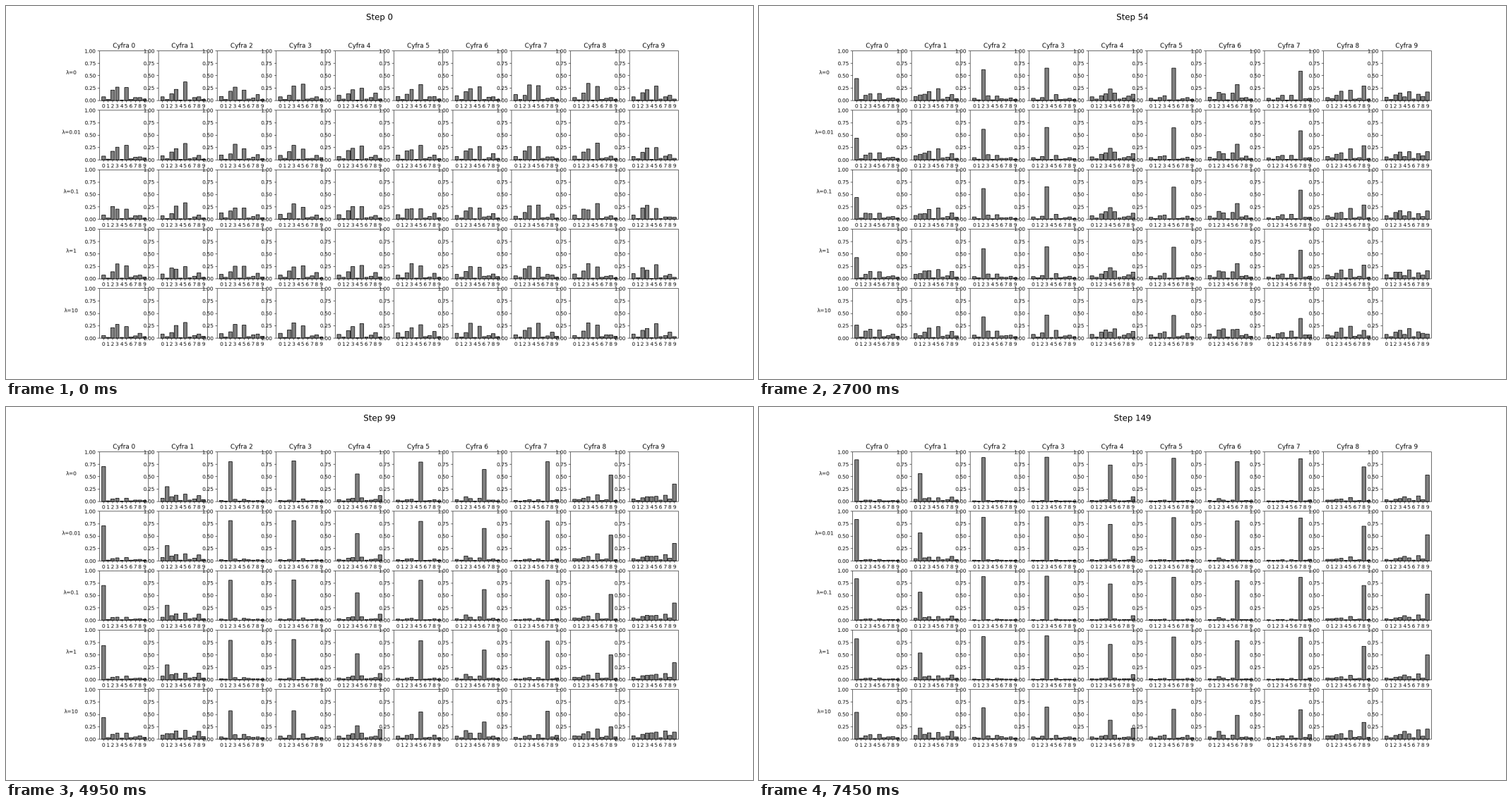
Recreate the animation shown at these times as a matplotlib script. Size 1058 by 529 pixels, loop 7.5 s.

```python
import matplotlib.pyplot as plt
import numpy as np
from matplotlib.animation import FuncAnimation
from matplotlib.collections import PolyCollection
from matplotlib.patches import PathPatch
from matplotlib.path import Path
from matplotlib.textpath import TextPath

STEPS, MID = 150, 54
LAMBDAS = ["0", "0.01", "0.1", "1", "10"]
ROWS, DIGITS = len(LAMBDAS), 10
W, H, DPI = 1058, 529, 52.9
FINE_W, FINE_H, FINE_DPI = 2000, 1000, 100

# Untrained class probabilities, shared by all panels up to noise
BIAS = np.array([0.085, 0.02, 0.15, 0.24, 0.01, 0.27, 0.025, 0.055, 0.09, 0.03])
# Probability of the right digit at step MID and at the last step
HALF = np.array([0.44, 0.11, 0.62, 0.655, 0.235, 0.65, 0.32, 0.59, 0.29, 0.17])
LAST = np.array([0.84, 0.565, 0.885, 0.893, 0.735, 0.872, 0.805, 0.868, 0.70, 0.53])
# Strong regularisation slows the learning (logit shift per lambda)
SLOWDOWN = np.array([0, 0, 0, -0.1, -1.5])[:, None]
LOOKALIKES = {(4, 9): 8, (7, 9): 4, (2, 6): 2.5, (1, 8): 2, (5, 8): 1.5}


def logit(p):
    return np.log(p / (1 - p))


def normal(p):
    return p / p.sum(axis=-1, keepdims=True)


def progress(step, tau=115):
    return (1 - np.exp(-step / tau)) / (1 - np.exp(-(STEPS - 1) / tau))


def confusion():
    """How the wrong classes of each digit share the rest at the end."""
    c = np.tile(np.sqrt(BIAS), (DIGITS, 1))
    for (a, b), boost in LOOKALIKES.items():
        c[a, b] *= boost
        c[b, a] *= boost
    np.fill_diagonal(c, 0)
    return normal(c)


own = np.eye(DIGITS, dtype=bool)
rng = np.random.default_rng(4)
first = normal(BIAS * np.exp(rng.normal(0, 0.22, (ROWS, DIGITS, 10))))
first_rest = np.sqrt(normal(np.where(own, 0, first)))
last_rest = np.sqrt(confusion())
z0 = logit((first * own).sum(axis=2))
um = progress(MID)
zm = logit(HALF) + SLOWDOWN * um
z1 = logit(LAST) + SLOWDOWN
bend = (zm - z0 - (z1 - z0) * um) / (um * (1 - um))


def heights(step):
    u = progress(step)
    hit = 1 / (1 + np.exp(-(z0 + (z1 - z0) * u + bend * u * (1 - u))))
    rest = normal(((1 - u) * first_rest + u * last_rest) ** 2)
    return np.where(own, hit[..., None], rest * (1 - hit[..., None])).ravel()


def area_weights(n_out, n_in):
    """Matrix that averages n_in pixels down to n_out."""
    scale = n_in / n_out
    i, j = np.arange(n_out)[:, None], np.arange(n_in)
    overlap = np.minimum((i + 1) * scale, j + 1) - np.maximum(i * scale, j)
    return np.clip(overlap, 0, None) / scale


# Axes and labels never change: draw them once, finely, as a clear layer
fig, axes = plt.subplots(ROWS, DIGITS, figsize=(20, 10), dpi=DPI)
fig.set_dpi(FINE_DPI)
fig.patch.set_visible(False)
boxes = []
for r in range(ROWS):
    for d in range(DIGITS):
        ax = axes[r, d]
        ax.set(xlim=(-0.89, 9.89), ylim=(0, 1), xticks=range(10),
               yticks=np.linspace(0, 1, 5))
        ax.patch.set_visible(False)
        if r == 0:
            ax.set_title(f"Cyfra {d}")
        if d == 0:
            ax.set_ylabel(f"λ={LAMBDAS[r]}", rotation=0, labelpad=25)
        for k in range(10):
            (xa, ya), (xb, yb) = ax.transData.transform(
                [(k - 0.4, 0), (k + 0.4, 1)])
            boxes.append((xa, xb, ya, yb - ya))
fig.canvas.draw()
ink = np.array(fig.canvas.buffer_rgba())[..., 3].astype(float)
layer = np.zeros((H, W, 4), np.uint8)
layer[..., 3] = np.rint(area_weights(H, FINE_H) @ ink
                        @ area_weights(W, FINE_W).T)
fig.clf()
fig.set_dpi(DPI)
fig.patch.set_visible(True)

left, right, base, scale = np.array(boxes).T


def snap_x(x):
    return np.floor(x + 0.5) + 0.5


def snap_y(y):
    return np.ceil(y - 0.5) - 0.5


stage = fig.add_axes([0, 0, 1, 1])
stage.set(xlim=(0, FINE_W), ylim=(0, FINE_H))
stage.axis("off")
bars = PolyCollection([], facecolors="gray", edgecolors="black",
                      linewidths=1, joinstyle="miter", snap=False)
stage.add_collection(bars, autolim=False)
title = stage.add_patch(PathPatch(Path([(0, 0)]), color="black", lw=0))
fig.figimage(layer, origin="upper", zorder=5)


def title_path(text):
    glyphs = TextPath((0, 0), text, size=16 * FINE_DPI / 72)
    box = glyphs.get_extents()
    shift = (FINE_W / 2 - (box.x0 + box.x1) / 2, FINE_H - 37)
    return Path(glyphs.vertices + shift, glyphs.codes)


def draw(step):
    xa, xb = snap_x(left), snap_x(right)
    ya, yb = snap_y(base), snap_y(base + scale * heights(step))
    bars.set_verts(np.stack([
        np.column_stack([xa, ya]), np.column_stack([xb, ya]),
        np.column_stack([xb, yb]), np.column_stack([xa, yb]),
    ], axis=1))
    title.set_path(title_path(f"Step {step}"))
    return bars, title


anim = FuncAnimation(fig, draw, frames=STEPS, init_func=lambda: draw(0),
                     interval=50, repeat=True, repeat_delay=0, blit=False)
plt.show()
```
